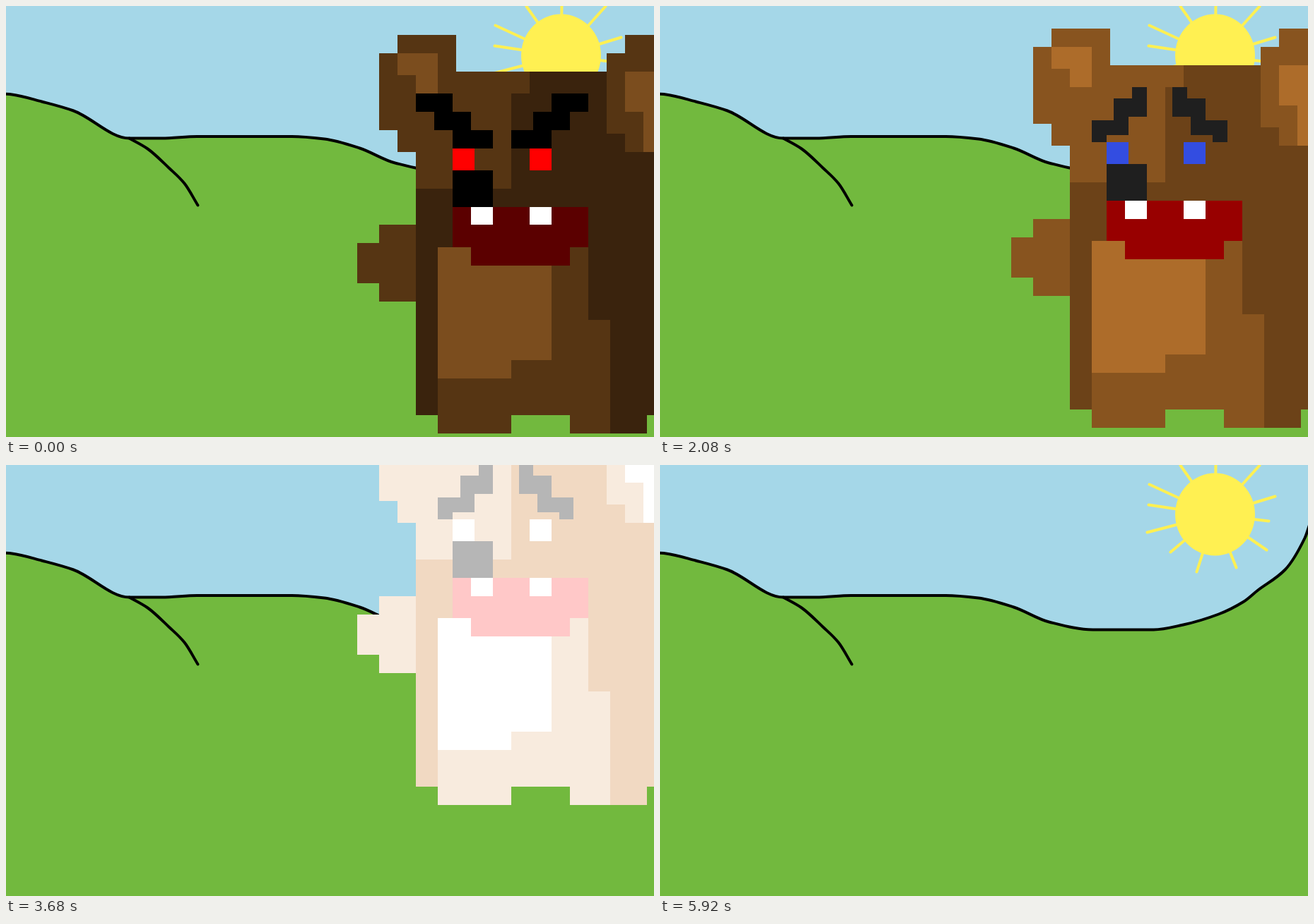
Animation of 917x611 px, one loop 6000 ms. Source, as an HTML page with a canvas:

```html
<!DOCTYPE html>
<html lang="en">
<meta charset="utf-8">
<title>Bear on the hill</title>
<style>
  html, body { margin: 0; width: 100%; height: 100%; overflow: hidden; }
  canvas { display: block; }
</style>
<canvas width="917" height="611"></canvas>
<script>
const ctx = document.querySelector('canvas').getContext('2d');
const LOOP = 6000, STEP = 80, CELL = 5.188, REST = 32.2;
const CALM = 2000, GONE = 5920;

const points = text => text.split(', ').map(p => p.split(' ').map(Number));
const RIDGE = points('-4 124, 8 125, 50 135, 95 148, 174 187, 220 187, 270 184.5, 404 184.5, 450 188, 500 201, ' +
  '550 222, 612 233, 698 233, 740 226, 790 211, 825 193.5, 845 177.5, 884 148, 912 103, 920 80');
const FOLD = points('174 187, 200 202, 230 229, 252 251, 271 282');
const RAY_TIPS = points('736 0, 786 -2, 848 0, 870 44, 861 79, 858 120, 815 145, 759 151, 722 123, 689 95, 691 56, 692 27');

// Blocky outlines in grid cells: a start x and y, then alternately the next x and the next y.
const BODY = [
  ['fur', '11 0 27 10 68 5 73 0 82 104 69 109 58 104 42 109 22 104 16 73 6 68 0 57 6 52 16 32 11 26 6 5'],
  ['dark', '47 10 68 27 73 32 82 104 79 109 69 78 63 58 22 104 16 42 42 16'],
  ['light', '22 58 53 89 42 94'],
  ['light', '11 5 22 16 16 11'],
  ['light', '73 10 82 32 78 21'],
  ['mouth', '26 47 63 58 58 63 31 58'],
  ['teeth', '31 47 37 52'],
  ['teeth', '47 47 53 52'],
  ['black', '26 37 37 47']
];
const EYE = '26 31 32 37';
const ANGRY_BROW = '16 16 26 21 31 26 37 31 26 26 21 21';
const SAD_BROW = '33 16 37 24 32 29 26 31 22 25 28 19';

// Hue, saturation and darkest lightness of each coat colour.
const COAT = {
  fur: [30.5, 63, 20.6], light: [30.5, 61, 30], dark: [29.5, 63, 13.9], black: [0, 0, 0],
  mouth: [0, 100, 17.8], teeth: [0, 0, 100], redEye: [0, 100, 50], blueEye: [231, 74, 42]
};

const clamp = (v, lo, hi) => Math.max(lo, Math.min(hi, v));

function along(keys, t) {
  let value = keys[0][1];
  for (let i = 1; i < keys.length; i++) {
    const [t0, v0] = keys[i - 1], [t1, v1] = keys[i];
    value += (v1 - v0) * clamp((t - t0) / (t1 - t0), 0, 1);
  }
  return value;
}

function bearY(t) {
  return t < CALM
    ? along([[0, 40.7], [3, 31.4], [7, 40.7]], t / STEP % 7)
    : along([[2960, REST], [3600, -60], [4000, -178.5], [GONE, -551]], t);
}

function drawBear(t) {
  const left = 497 + along([[3600, 0], [4000, 1.6]], t), top = bearY(t);
  const glow = along([[1940, 0], [2770, 71.5]], t);

  function block(name, outline, mirror) {
    const [h, s, l] = COAT[name];
    ctx.fillStyle = `hsl(${h} ${s}% ${Math.min(100, l + glow)}%)`;
    const n = outline.split(' ').map(Number);
    const px = k => Math.round(left + CELL * (mirror ? mirror - k : k));
    const py = k => Math.round(top + CELL * k);
    ctx.beginPath();
    for (let i = 1; i < n.length; i += 2) {
      ctx.lineTo(px(n[i - 1]), py(n[i]));
      ctx.lineTo(px(n[(i + 1) % n.length]), py(n[i]));
    }
    ctx.fill();
  }

  for (const [name, outline] of BODY) block(name, outline);
  const calm = t >= CALM;
  for (const side of [0, 1]) {
    block(calm ? 'blueEye' : 'redEye', EYE, side * 79);
    block('black', calm ? SAD_BROW : ANGRY_BROW, side * (calm ? 81 : 79));
  }
}

// Smooth curve through all the points.
function curve(pts) {
  const path = new Path2D();
  path.moveTo(...pts[0]);
  for (let i = 1; i < pts.length; i++) {
    const a = pts[i - 1], b = pts[i], before = pts[i - 2] || a, after = pts[i + 1] || b;
    // Handles reach a third of the way across, so flat stretches stay flat.
    const dx = (b[0] - a[0]) / 3;
    const slope = (p, q, r) => {
      const m = (q[1] - p[1]) / (q[0] - p[0] || 1), n = (r[1] - q[1]) / (r[0] - q[0] || 1);
      return p === q ? n : q === r ? m : m * n > 0 ? 2 * m * n / (m + n) : 0;
    };
    path.bezierCurveTo(a[0] + dx, a[1] + dx * slope(before, a, b), b[0] - dx, b[1] - dx * slope(a, b, after), ...b);
  }
  return path;
}

function drawScene() {
  ctx.fillStyle = '#a5d7e8';
  ctx.fillRect(0, 0, 917, 611);
  ctx.save();
  ctx.translate(0.5, 0.5);
  ctx.lineWidth = 4;
  ctx.lineCap = ctx.lineJoin = 'round';
  ctx.strokeStyle = ctx.fillStyle = '#fff052';
  ctx.beginPath();
  for (const tip of RAY_TIPS) {
    ctx.moveTo(...tip);
    ctx.lineTo(785, 70);
  }
  ctx.stroke();
  ctx.beginPath();
  ctx.ellipse(785, 69.5, 56.5, 58.5, 0, 0, 2 * Math.PI);
  ctx.fill();

  const ridge = curve(RIDGE), hill = new Path2D(ridge);
  hill.lineTo(920, 620);
  hill.lineTo(-4, 620);
  ctx.fillStyle = '#72b93e';
  ctx.fill(hill);
  ctx.strokeStyle = '#000';
  ctx.stroke(ridge);
  ctx.stroke(curve(FOLD));
  ctx.restore();
}

const start = performance.now();
function frame() {
  const t = Math.floor((performance.now() - start) % LOOP / STEP) * STEP;
  drawScene();
  if (t < GONE) drawBear(t);
  requestAnimationFrame(frame);
}
frame();
</script>
</html>
```
